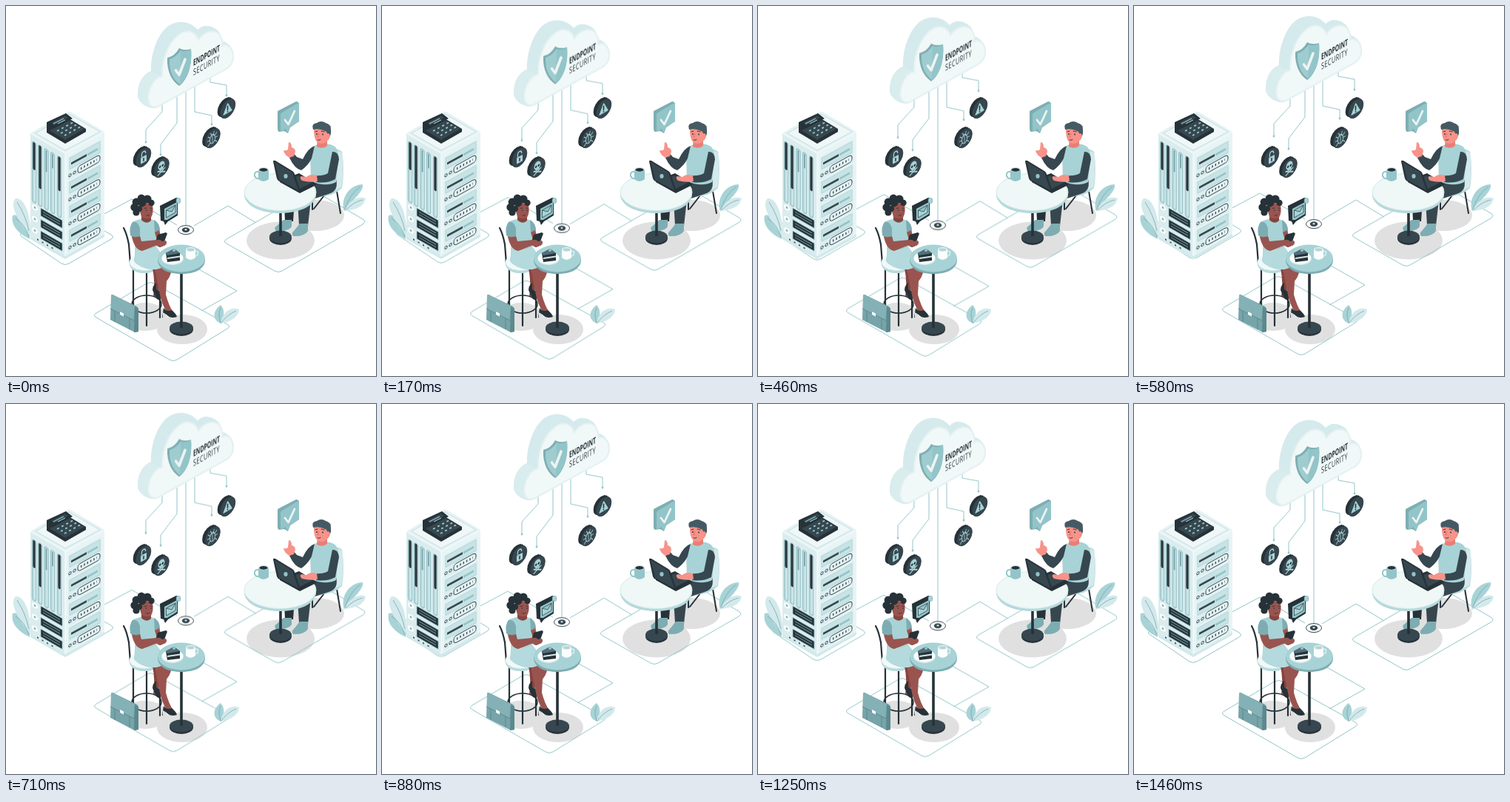
Recreate the animation shown at these times as an HTML page. Size 500x500 px, loop 1500 ms.

```html
<!DOCTYPE html>
<html lang="en">
<head>
<meta charset="utf-8">
<title>Endpoint security</title>
<style>
  html, body { margin: 0; width: 100%; height: 100%; overflow: hidden; background: #fff; }
  svg { display: block; width: 100vw; height: 100vh; }
  .float { animation: float 1.5s linear infinite; }
  /* up and down at constant speed, with a short rest at the bottom */
  @keyframes float {
    0%, 97.33%, 100% { transform: translateY(0); }
    48.67% { transform: translateY(-10px); }
  }
  .dark { fill: #263238; }
  .slate { fill: #37474f; }
  .teal { fill: #92c5c9; }
  .mid { fill: #a8d3d6; }
  .deep { fill: #7dadb2; }
  .pale { fill: #d3e9eb; }
  .mist { fill: #e5f2f3; }
  .white { fill: #fafdfd; }
  .shade { fill: #e0e0e0; }
  .skin { fill: #f79389; }
  .brown { fill: #9a544f; }
  .wire { fill: none; stroke: #92c5c9; }
  .vein { fill: none; stroke: #78a8ad; stroke-width: .8; }
  .ink { fill: none; stroke: #263238; stroke-linecap: round; stroke-linejoin: round; }
  .tick { fill: none; stroke: #eef3f3; stroke-linecap: round; stroke-linejoin: round; }
  text { font-family: "Open Sans", "Noto Sans", sans-serif; font-size: 11.8px; fill: #263238; }
</style>
</head>
<body>
<svg viewBox="0 0 500 500" xmlns="http://www.w3.org/2000/svg">
<defs>
  <g id="disc">
    <g transform="matrix(.866 -.5 0 1 -2 -1)"><circle r="11.9" class="dark"/></g>
    <path d="M-12 8L-8 11L7 -14L2 -15Z" class="dark"/>
    <g transform="matrix(.866 -.5 0 1 1.5 .5)"><circle r="11.9" class="slate" stroke="#263238" stroke-width=".8"/></g>
  </g>
  <g id="unit">
    <path d="M4 8H49V39H4Z" fill="#dceef0"/>
    <path d="M6 10H47V25H6Z" fill="#c9e3e5" stroke="#a8d3d6" stroke-width=".7"/>
    <path d="M8 18.5H29" stroke="#37474f" stroke-width="3"/>
    <path d="M30 18.5H44" stroke="#92c5c9" stroke-width="3"/>
    <rect x="17" y="27.5" width="30" height="9.5" rx="4" class="mist" stroke="#37474f" stroke-width="1"/>
    <path d="M21 32.2H43" stroke="#37474f" stroke-width="3" stroke-dasharray="1.4 2.9"/>
    <g class="mist" stroke="#37474f" stroke-width=".9"><circle cx="6.5" cy="33.3" r="1.7"/><circle cx="12.5" cy="33" r="1.7"/></g>
  </g>
  <g id="slot">
    <rect x="-2.6" y="0" width="5.2" height="82" rx="2.2" fill="#b9dcdf" stroke="#83b4b9" stroke-width=".7"/>
    <path d="M1 3V79" stroke="#e0f0f1" stroke-width="1.2"/>
  </g>
  <g id="tray">
    <path d="M14 0H43V10.5H14Z" class="dark" stroke="#92c5c9" stroke-width=".6"/>
    <path d="M17 3.5H40M17 7H40" stroke="#6f979c" stroke-width="1.2"/>
    <ellipse cx="6" cy="4" rx="4" ry="3.6" class="white"/><circle cx="6" cy="4" r="1.4" class="deep"/>
  </g>
</defs>

<!-- ground shadows -->
<g class="shade">
  <ellipse cx="371" cy="317" rx="46" ry="25.5"/>
  <ellipse cx="418" cy="283" rx="39" ry="21"/>
  <ellipse cx="238" cy="437" rx="34" ry="20"/>
  <ellipse cx="188" cy="420" rx="30" ry="19"/>
</g>

<!-- floating floor outlines -->
<g class="float">
  <g class="wire" stroke-width="1">
    <path d="M60 285L22 306Q17 309 22 312L75 348Q80 351 85 348L142 315Q147 312 142 309L105 288"/>
    <path d="M110 293L170 261L231 296M254 297L300 270L338 293"/>
    <path d="M298 315L409 251Q414 248 419 251L482 288Q488 291 482 295L373 358Q368 361 363 358L298 321Q293 318 298 315Z"/>
    <path d="M122 415L190 375Q195 372 200 375L299 430Q304 433 299 436L231 478Q226 481 221 478L122 421Q117 418 122 415Z"/>
    <path d="M264 412L312 385L240 344"/>
    <path d="M243 100V302"/>
  </g>
  <ellipse cx="243" cy="302.6" rx="10.5" ry="6" class="white" stroke="#37474f"/>
  <ellipse cx="243" cy="302.6" rx="5.2" ry="3.3" class="slate"/>
  <ellipse cx="243" cy="302.2" rx="1.6" ry="1" class="white"/>
</g>

<!-- plants -->
<g id="plants">
  <path d="M32 315C15 307 6 295 9 283C21 280 33 294 32 315Z" class="mid"/>
  <path d="M31 309C16 290 4 269 13 260C25 259 34 282 33 311Z" class="pale"/>
  <path d="M13 287Q25 294 31 312M15 265Q27 284 31 304" class="vein"/>
  <path d="M457 278C451 258 466 241 482 241C484 251 468 261 457 278Z" class="mid"/>
  <path d="M457 277C464 261 478 256 486 260C484 272 470 276 457 277Z" class="pale"/>
  <path d="M458 275Q465 253 479 244M459 276Q469 265 482 262" class="vein"/>
  <path d="M291 429C278 425 279 412 290 404C296 410 295 419 291 429Z" class="mid"/>
  <path d="M290 429C293 411 306 406 315 410C315 419 304 427 290 429Z" class="pale"/>
  <path d="M290 429Q300 416 311 412M290 428Q286 416 290 408" class="vein"/>
</g>

<!-- server -->
<g id="server">
  <path d="M33 172L80 199V342L33 315Z" fill="#dbecee"/>
  <path d="M80 199L133 170V312L80 342Z" fill="#e8f4f5"/>
  <path d="M33 172L83 143Q85 142 87 143L133 170L80 199Z" class="mist"/>
  <path d="M40 172L85 146L127 170L80 195Z" fill="#f0f7f8" stroke="#b5d8db" stroke-width=".8"/>
  <path d="M33 172L80 199L133 170M80 199V342" fill="none" stroke="#f5fafa" stroke-width="1.2"/>
  <path d="M33 311L80 338L133 308V312L80 342L33 315Z" class="pale"/>
  <g transform="matrix(1 .574 0 1 33 172)">
    <use href="#slot" x="5" y="9"/><use href="#slot" x="13" y="9"/><use href="#slot" x="21.5" y="9"/><use href="#slot" x="30" y="9"/><use href="#slot" x="39" y="9"/>
    <path d="M5 11V45M13 11V66M39 11V54" stroke="#263238" stroke-width="3.2" stroke-linecap="round"/>
    <path d="M21.5 11V40M30 11V30" stroke="#6c9ca2" stroke-width="1.6"/>
    <use href="#tray" y="93"/><use href="#tray" y="108.5"/><use href="#tray" y="124"/>
    <path d="M9 138H34" stroke="#37474f" stroke-width="1.8" stroke-dasharray="2 4.5"/>
  </g>
  <g transform="matrix(1 -.55 0 1 80 199)">
    <use href="#unit" y="0"/><use href="#unit" y="32.5"/><use href="#unit" y="65"/><use href="#unit" y="97.5"/>
  </g>
  <path d="M55 166L83 151L108 166V170L80 186L55 171Z" class="dark"/>
  <path d="M57 167L83 153L106 166L80 181Z" class="slate"/>
  <path d="M55 157L81 145L90 152L64 166L55 169Z" class="dark"/>
  <path d="M61 158L80 148L84 151L65 161Z" class="slate"/>
  <path d="M64 159L78 152M70 159L80 154" stroke="#92c5c9" stroke-width="1.2"/>
  <g fill="none" stroke="#92c5c9" stroke-width="1.9" stroke-dasharray="3 4">
    <path d="M69 169L91 157"/><path d="M74 172L96 160"/><path d="M79 175L101 163"/>
  </g>
</g>

<!-- threat discs -->
<use href="#disc" x="184" y="204"/>
<use href="#disc" x="208.5" y="218"/>
<use href="#disc" x="277.5" y="178"/>
<use href="#disc" x="298" y="138"/>
<g transform="matrix(.866 -.5 0 1 186 204.5)">
  <rect x="-4.6" y="-1.5" width="9.2" height="8.5" rx="1" class="mid"/>
  <path d="M-3 -2V-5A3 3 0 0 1 3 -5V-4" fill="none" stroke="#a8d3d6" stroke-width="1.5"/>
  <path d="M0 1.5V4.5" stroke="#263238" stroke-width="1.8" stroke-linecap="round"/>
</g>
<g transform="matrix(.866 -.5 0 1 210 218.5)">
  <path d="M-5.5 2.5L5.5 8M5.5 2.5L-5.5 8" stroke="#a8d3d6" stroke-width="1.7" stroke-linecap="round"/>
  <path d="M-3 3.5V1C-7 -1 -5 -8.5 0 -8.5S7 -1 3 1V3.5Z" class="mid"/>
  <circle cx="-2.1" cy="-2.3" r="1.5" class="dark"/><circle cx="2.1" cy="-2.3" r="1.5" class="dark"/>
</g>
<g transform="matrix(.866 -.5 0 1 279 178.5)" fill="none" stroke="#a8d3d6" stroke-width="1">
  <ellipse cy="1.5" rx="4" ry="5.6"/>
  <path d="M-2.6 -3A2.7 2.7 0 0 1 2.6 -3M0 -3V7M-4 1H-8M4 1H8M-3.4 -1.5L-7 -5M3.4 -1.5L7 -5M-3.4 4.5L-7 8M3.4 4.5L7 8M-1.5 -5L-3 -8M1.5 -5L3 -8"/>
</g>
<g transform="matrix(.866 -.5 0 1 299.5 138.5)">
  <path d="M0 -6.5L6.3 5.5H-6.3Z" class="mid" stroke="#a8d3d6" stroke-width="1.4" stroke-linejoin="round"/>
  <path d="M0 -3V1.5M0 4V4.2" stroke="#263238" stroke-width="1.8" stroke-linecap="round"/>
</g>

<!-- floating cloud -->
<g class="float">
  <path d="M211 130V143L189 167V184M231 118V158L209 187V201M255 104V143L278 148V160M276 92V103L298 107V121" class="wire"/>
  <g class="teal"><circle cx="189" cy="184" r="1.4"/><circle cx="209" cy="201" r="1.4"/><circle cx="278" cy="160" r="1.4"/><circle cx="298" cy="121" r="1.4"/></g>
  <path d="M200 138C190 138 178 130 178 120C178 104 185 92 196 88C195 65 205 38 218 28C232 18 248 20 259 32C266 25 276 25 286 33C291 38 291 44 291 47C301 49 308 58 308 68C308 77 303 83 297 86L207 136C204 138 202 138 200 138Z" fill="#d5eaec"/>
  <path d="M178 120C178 104 185 92 196 88L211 95C200 98 193 108 193 121L196 137C186 135 178 128 178 120Z" fill="#d9ecee"/>
  <path d="M205 136C196 139 190 131 193 118C195 106 203 96 211 95C210 78 217 52 232 40C244 30 256 34 260 46C268 33 284 30 290 41C293 46 293 50 292 54C300 50 307 58 307 68C307 77 302 83 296 86Z" fill="#f1f8f8" stroke="#e4f1f2" stroke-width="2"/>
  <path d="M218 70Q228 68 234 57Q241 61 250 58C252 80 246 99 234 108C224 101 217 88 218 70Z" class="deep"/>
  <path d="M221 72Q230 69 236 60Q242 63 250 59C251 80 246 97 235 106C226 99 220 88 221 72Z" fill="#9fcccf"/>
  <path d="M236 60Q242 63 250 59C251 80 246 97 235 106Z" class="teal"/>
  <path d="M229.5 87L234 93L242 72" class="tick" stroke-width="3.6"/>
  <text transform="matrix(.58 -.33 0 1 253 81)" font-weight="700">ENDPOINT</text>
  <text transform="matrix(.61 -.345 0 1 253 94)" letter-spacing=".8">SECURITY</text>
</g>

<!-- check bubble -->
<path d="M367 142L392 129Q395 129 396 132V156L384 164L381 172L376 169L369 170Q367 169 367 166Z" class="deep"/>
<path d="M371 147Q371 145 373 144L393 132Q396 131 396 134V154Q396 156 394 157L384 163L380 172L378 166L373 169Q371 170 371 167Z" class="teal"/>
<path d="M377 154L381.5 160L390 142" class="tick" stroke-width="2.8"/>

<!-- man -->
<g id="man">
  <path d="M447 250L452 280M430 256L416 274M414 250V275" class="ink" stroke-width="2"/>
  <path d="M438 200Q448 190 454 197Q458 222 454 246Q440 260 414 257L412 249Q430 250 438 242Z" fill="#b9dadd"/>
  <path d="M443 199Q451 192 455 202Q457 226 453 245L443 250Z" class="pale"/>
  <path d="M376 268L390 262L388 291H377Z" class="dark"/>
  <path d="M413 234H446Q450 250 436 254L412 262L408 297L396 296L394 262Q396 246 413 234Z" class="slate"/>
  <path d="M375 289H386V298Q382 305 365 304Q361 300 366 297Z" class="deep"/>
  <path d="M397 294H408V304Q403 312 388 311Q385 307 389 304Z" class="deep"/>
  <path d="M417 189Q424 184 438 187Q450 190 449 204L446 238Q432 245 412 237L411 200Z" class="mid"/>
  <path d="M417 189Q408 192 401 207L393 204L388 198L383 205Q390 220 399 222Q408 216 413 206Z" class="slate"/>
  <path d="M383 205Q376 201 375 195Q379 196 381 194L382 184Q386 184 386 191Q391 192 391 197L389 203Z" class="skin"/>
  <path d="M421 180H434V189Q428 194 420 190Z" fill="#e87f76"/>
  <path d="M416 167Q416 161 423 160L436 161Q440 168 437 179Q432 187 424 186Q416 184 416 167Z" class="skin"/>
  <path d="M415 167Q412 159 420 158Q426 154 432 158Q440 160 439 168Q440 174 436 178L434 174Q434 169 431 169Q424 165 415 167Z" fill="#455a64"/>
  <circle cx="435" cy="175" r="2.8" class="skin"/>
  <path d="M418 170L421 169M426 169L430 170M421 181Q423 182 425 180.5" class="ink" stroke-width=".9"/>
  <circle cx="420" cy="173" r=".9" class="dark"/><circle cx="428" cy="173.5" r=".9" class="dark"/>
  <path d="M423 172L421 177H423" fill="none" stroke="#d9695f" stroke-width=".8"/>
</g>

<!-- large table -->
<ellipse cx="371" cy="314" rx="15" ry="9" class="dark"/><ellipse cx="371" cy="312" rx="15" ry="8.5" class="slate"/>
<path d="M371 270V311" stroke="#263238" stroke-width="3.6"/>
<path d="M322 251V256C324 271 345 280 370 280S417 271 419 256V251Z" fill="#b5d8db"/>
<ellipse cx="370.5" cy="251.5" rx="48.5" ry="25" fill="#eff7f7" stroke="#d3e9eb"/>
<path d="M342 224Q335 223 336 230Q338 234 343 233" fill="none" stroke="#92c5c9" stroke-width="1.8"/>
<path d="M341 221H355V234Q348 240 341 234Z" class="teal"/>
<ellipse cx="348" cy="221" rx="7" ry="3.3" class="pale"/><ellipse cx="348" cy="221.4" rx="5.5" ry="2.3" class="dark"/>

<!-- laptop and near arm -->
<path d="M370 236L396 226L419 240V242L397 253L370 238Z" class="dark"/>
<path d="M378 236L396 229L413 239L397 247Z" class="slate"/>
<path d="M441 197Q449 196 450 207L445 234Q434 240 419 238L417 229Q428 230 435 226Z" class="slate"/>
<path d="M420 229L421 237Q411 239 400 236Q396 232 399 230L406 231Q411 226 420 229Z" class="skin"/>
<path d="M361 210Q361 208 364 209L387 223Q389 224 390 227L398 251L370 237Q367 236 366 233Z" class="dark"/>
<path d="M363 210.5L387 225L395 249L369 235Z" class="slate"/>
<ellipse cx="378" cy="230" rx="2.6" ry="3" class="teal"/>

<!-- mail bubble -->
<path d="M208 270L230 259Q232 259 232 262V283L219 291L215 296L213 291L209 290Z" class="dark"/>
<path d="M214 274L231 265V281L218 289L214 289Z" class="teal"/>
<path d="M216.500 276L229 269V279L216.500 286ZM216.500 276L224 278L229 269" fill="#a8d3d6" stroke="#37474f" stroke-width=".8"/>
<ellipse cx="233" cy="263" rx="3" ry="3.8" class="mid" stroke="#78a8ad" stroke-width=".6"/>

<!-- stool -->
<g class="ink" stroke-width="2.2">
  <path d="M159 300Q163 307 166 322L168 348"/>
  <path d="M172 354V411M208 354V421M190 358V432"/>
  <ellipse cx="190" cy="403" rx="20" ry="12" stroke-width="1.5"/>
</g>
<path d="M167 345V351Q172 362 190 361Q207 359 209 350V345Z" fill="#b9dadd"/>
<ellipse cx="188" cy="346" rx="21" ry="11.5" fill="#f1f8f8"/>

<!-- woman -->
<g id="woman">
  <path d="M198 354L216 350Q214 365 207 381L205 394L199 392Q202 375 198 354Z" fill="#85453f"/>
  <path d="M203 374Q198 378 198 384L204 396L209 398L207 385L203 383Z" class="dark"/>
  <path d="M200 350Q213 345 223 353Q225 362 217 372L216 390Q220 405 226 414L219 417Q209 401 207 385Q203 366 200 350Z" class="brown"/>
  <path d="M213 408Q217 414 224 411Q230 416 231 420Q222 423 217 417L212 414V421H211Z" class="dark"/>
  <path d="M171 292Q180 286 196 288Q206 290 208 302L203 326Q214 340 219 349Q207 357 196 356Q181 354 173 345Q175 330 174 318Q166 302 171 292Z" class="mid"/>
  <path d="M176 327Q190 333 203 325Q214 340 219 349Q207 357 196 356Q181 354 173 345Q174 338 176 327Z" fill="#b5dadd"/>
  <path d="M183 283H196V290Q190 296 183 289Z" fill="#85453f"/>
  <path d="M179 270Q188 263 198 269Q200 279 196 286Q190 289 183 285Z" class="brown"/>
  <g class="dark">
    <circle cx="176" cy="265" r="5.4"/><circle cx="183" cy="260" r="5.4"/><circle cx="191" cy="261" r="5.6"/><circle cx="196.500" cy="266" r="4.2"/>
    <circle cx="173.500" cy="272" r="5.2"/><circle cx="176" cy="279" r="4.6"/><circle cx="184" cy="266" r="5.4"/><circle cx="180" cy="274" r="4"/>
  </g>
  <path d="M187 273.500L190 273M195 273L197 273.500M190 283Q193 284 194 282" class="ink" stroke-width=".8"/>
  <circle cx="189.500" cy="276" r=".8" class="dark"/><circle cx="196" cy="276" r=".8" class="dark"/>
  <path d="M169 306L180 307L183 318L204 316L207 322L184 331Q172 329 169 306Z" class="brown"/>
  <path d="M171 292Q178 290 181 300L181 311Q174 314 168 310Q166 298 171 292Z" class="deep"/>
  <path d="M200 289Q208 293 208 304L201 307Z" class="deep"/>
  <path d="M201 306L207 303L210 313L204 316Z" class="brown"/>
  <path d="M205 309L216 306Q219 307 217 310L212 324Q209 327 207 325L202 319Z" class="dark"/>
  <path d="M202 317Q207 314 211 318L216 317Q219 321 214 324L207 326L201 322Z" class="brown"/>
</g>

<!-- small table -->
<ellipse cx="237" cy="437" rx="16" ry="9" class="dark"/><ellipse cx="237" cy="435" rx="16" ry="8.5" class="slate"/>
<path d="M237 355V435" stroke="#263238" stroke-width="3.6"/>
<path d="M205 340V345C207 356 219 362 237 362S267 356 269 345V340Z" class="deep"/>
<ellipse cx="237" cy="341" rx="32" ry="18.5" class="mid"/>
<ellipse cx="225" cy="342" rx="14.5" ry="8.3" class="pale"/><ellipse cx="225" cy="340.5" rx="14.5" ry="8.3" class="white"/>
<path d="M216 334L227 328L235 334V344L218 346Z" class="dark"/>
<path d="M216 334L227 328L235 334L218 337Z" fill="#546e7a"/>
<path d="M218 341L235 338.500" stroke="#d3e9eb" stroke-width="1.8"/>
<circle cx="227" cy="330" r="2" class="teal"/>
<path d="M256 331Q261 331 259 336Q258 338 255 338" fill="none" stroke="#e5f2f3" stroke-width="1.5"/>
<path d="M243 329H256V340Q249 346 243 340Z" class="white"/>
<ellipse cx="249.500" cy="329" rx="6.5" ry="3" class="mist"/><ellipse cx="249.500" cy="329.300" rx="4.8" ry="2" fill="#b9d3d5"/>

<!-- briefcase -->
<path d="M142 391Q143 389 146 391L177 406Q179 407 179 410V440L174 441L141 424Z" fill="#76a4a9"/>
<path d="M142 391Q143 389 146 391L174 406L172 424L157 418L142 409Z" fill="#84b1b5"/>
<path d="M174 406L179 409V440L173 441Z" fill="#5b898e"/>
<path d="M141 409L157 417L173 425M147 413V427M167 422V437" fill="none" stroke="#5b898e"/>
<path d="M154 413L159 415.500V419.500L154 417Z" class="white"/>
</svg>
</body>
</html>
```
